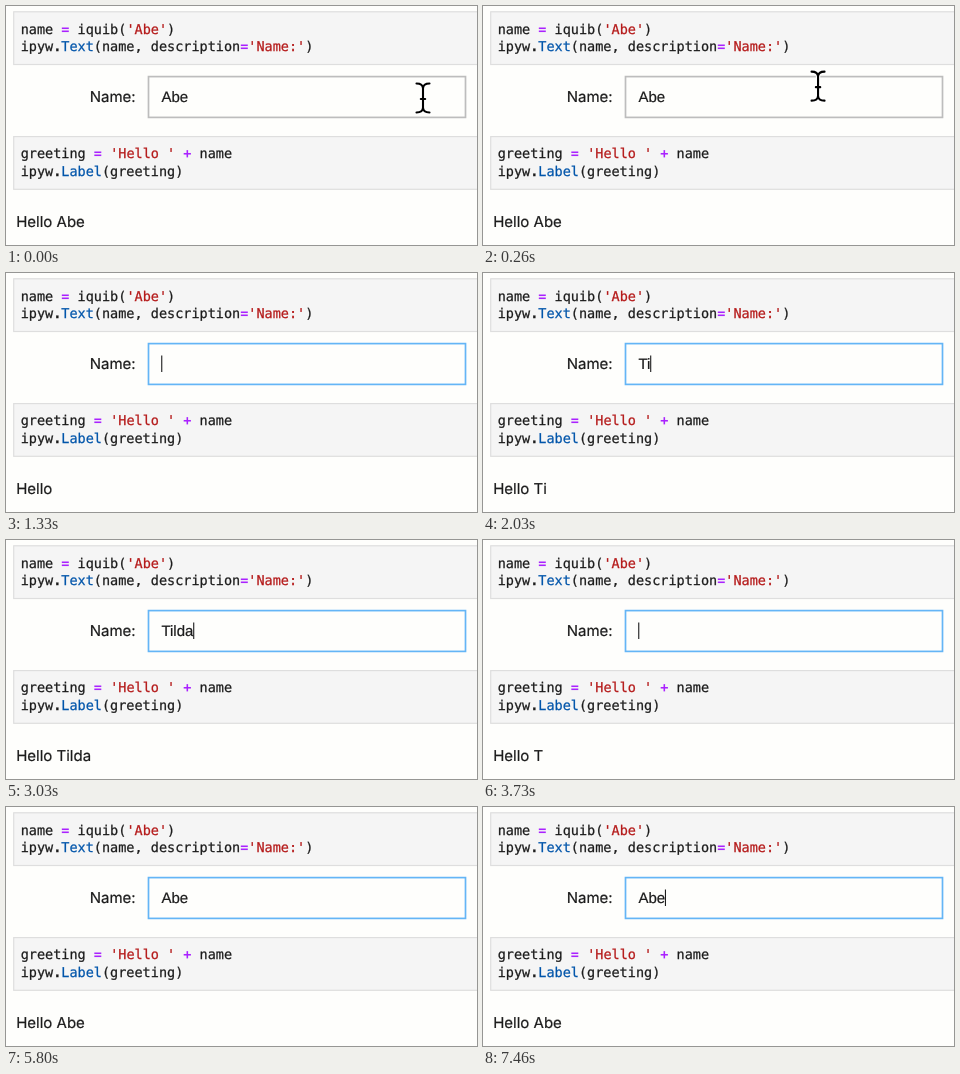
Animation of 471 by 239 pixels, one loop 7760 ms. Source, as an HTML page:

```html
<!DOCTYPE html>
<html lang="en">
<head>
<meta charset="utf-8">
<title>Notebook text field</title>
<style>
  html, body { margin: 0; width: 100%; height: 100%; overflow: hidden; background: #fefefc; }
  svg { display: block; width: 471px; height: 239px; }
  text { fill: #1c1c1c; stroke: #1c1c1c; stroke-width: .2px; white-space: pre; text-rendering: geometricPrecision; }
  .code { font: 13.5px "DejaVu Sans Mono", monospace; stroke-width: .25px; }
  .label { font: 15px Inter, sans-serif; }
  .field { font: 15px "Liberation Sans", Arial, sans-serif; }
  .cell { fill: #f5f5f5; stroke: #dedede; stroke-width: 1.2; }
  .op { fill: #aa22ff; stroke: none; font-weight: bold; }
  .dot { font-weight: bold; }
  .str { fill: #b51a1a; stroke: #b51a1a; }
  .prop { fill: #0055aa; stroke: #0055aa; }
  #cursor path { fill: none; stroke-linecap: round; }
</style>
</head>
<body>
<svg viewBox="0 0 471 239">
  <rect class="cell" x="7.7" y="5.8" width="480" height="52.7"/>
  <text class="code" x="14.7" y="27.8">name <tspan class="op">=</tspan> iquib(<tspan class="str">'Abe'</tspan>)</text>
  <text class="code" x="14.7" y="45.3">ipyw<tspan class="dot">.</tspan><tspan class="prop">Text</tspan>(name, description<tspan class="op">=</tspan><tspan class="str">'Name:'</tspan>)</text>

  <text class="label" x="83.7" y="96.2">Name:</text>
  <rect id="box" x="142.5" y="70.6" width="317" height="40.8" fill="none" stroke-width="1.7"/>
  <text class="field" id="input" x="155.4" y="96.1"></text>
  <rect id="caret" y="82.5" width="1.1" height="16.5" fill="#1c1c1c"/>

  <rect class="cell" x="7.7" y="130.6" width="480" height="52.7"/>
  <text class="code" x="14.7" y="152.2">greeting <tspan class="op">=</tspan> <tspan class="str">'Hello '</tspan> <tspan class="op">+</tspan> name</text>
  <text class="code" x="14.7" y="169.9">ipyw<tspan class="dot">.</tspan><tspan class="prop">Label</tspan>(greeting)</text>
  <text class="label" id="output" x="10.2" y="220.8"></text>

  <g id="cursor">
    <path id="beam" d="M-6.5-14.5Q0-14.5 0-9.5V9.5Q0 14.5-6.5 14.5M6.5-14.5Q0-14.5 0-9.5M0 9.5Q0 14.5 6.5 14.5M-2.2 1H2.2" stroke="#fff" stroke-width="4.4"/>
  </g>
</svg>
<script>
const LOOP = 7760, FOCUS = 500, CURSOR_GONE = 630, OUTPUT_LAG = 30;
const [box, input, caret, output, cursor, beam] =
  ['box', 'input', 'caret', 'output', 'cursor', 'beam'].map(id => document.getElementById(id));

// Black stroke on top of the white outline.
const core = beam.cloneNode();
core.removeAttribute('id');
core.setAttribute('stroke', '#000');
core.setAttribute('stroke-width', 2.1);
cursor.append(core);

const edits = [[0, 'Abe']];
const type = (word, times) => times.forEach((t, i) => edits.push([t, word.slice(0, i + 1)]));
const erase = (word, times) => times.forEach((t, i) => edits.push([t, word.slice(0, word.length - i - 1)]));
erase('Abe', [1160, 1200, 1230]);
type('Tilda', [1900, 2000, 2130, 2230, 2370]);
erase('Tilda', [3600, 3630, 3660, 3700, 3730]);
type('Abe', [4560, 4660, 4770]);

// The caret flips at each of these times, starting hidden.
const blinks = [FOCUS, 830, 1160, 1500, 1830, 2700, 3030, 3360, 3600, 4060, 4360,
  5130, 5460, 5800, 6130, 6460, 6800, 7130, 7460];

const path = [[20, 417, 92], [210, 327, 77], [330, 348, 85.2]];

const textAt = t => edits.findLast(([start]) => start <= Math.max(t, 0))[1];

function cursorAt(t) {
  const i = path.findIndex(([time]) => t < time);
  if (i === 0) return path[0].slice(1);
  if (i < 0) return path.at(-1).slice(1);
  const [t0, x0, y0] = path[i - 1], [t1, x1, y1] = path[i];
  const k = (1 - Math.cos(Math.PI * (t - t0) / (t1 - t0))) / 2;
  return [x0 + (x1 - x0) * k, y0 + (y1 - y0) * k];
}

function draw(t) {
  input.textContent = textAt(t);
  output.textContent = 'Hello ' + textAt(t - OUTPUT_LAG);
  box.setAttribute('stroke', t < FOCUS ? '#bdbdbd' : '#64b5f6');
  caret.setAttribute('x', 155.2 + (input.textContent ? input.getComputedTextLength() : 0));
  caret.setAttribute('visibility', blinks.filter(b => b <= t).length % 2 ? 'visible' : 'hidden');
  cursor.setAttribute('visibility', t < CURSOR_GONE ? 'visible' : 'hidden');
  cursor.setAttribute('transform', `translate(${cursorAt(t)})`);
}

const start = performance.now();
function tick() {
  draw((performance.now() - start) % LOOP);
  requestAnimationFrame(tick);
}
tick();
</script>
</body>
</html>
```
